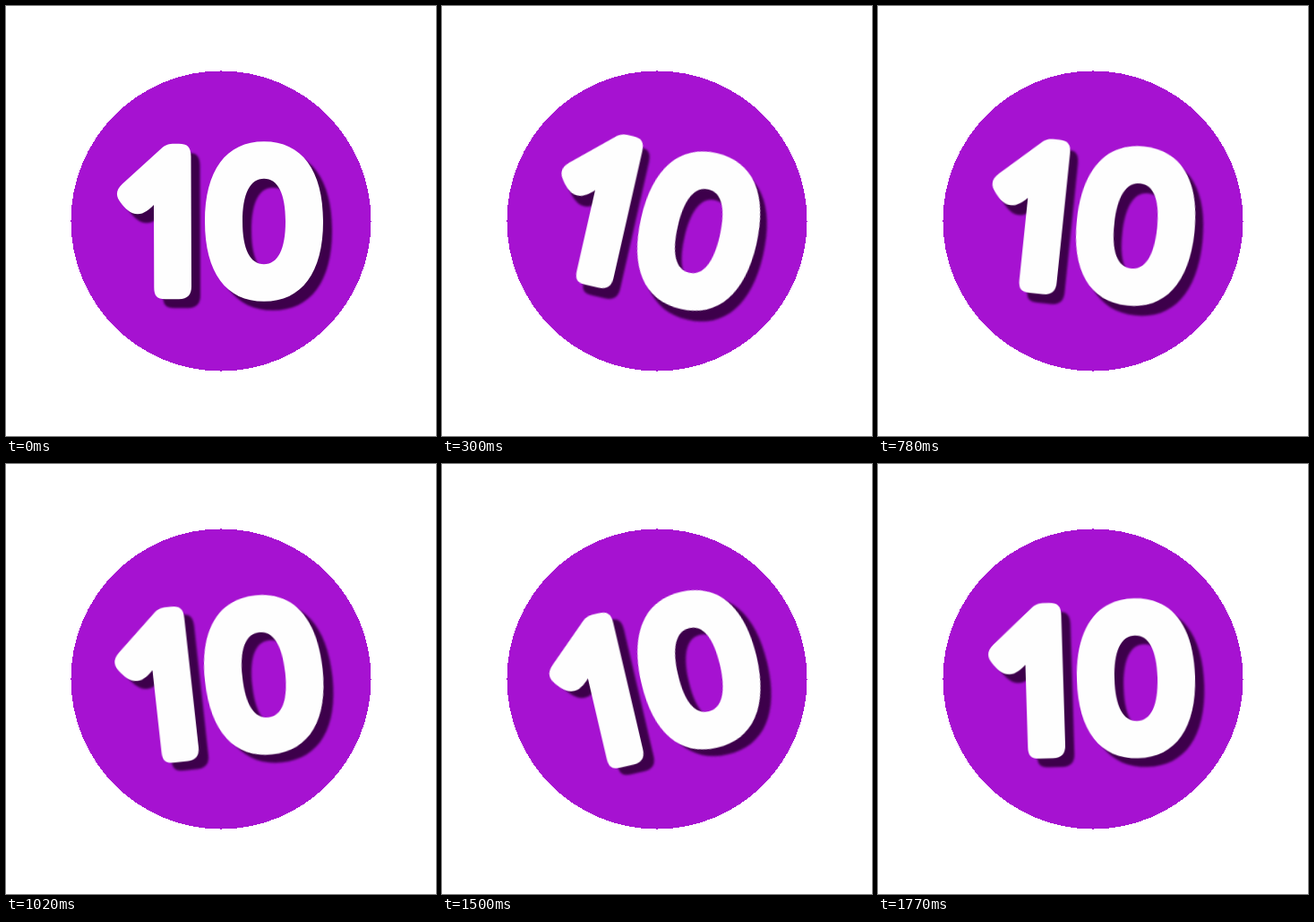
These frames come from a looping animation (480 px wide and 480 px high, 1.8 s). An HTML page:

```html
<!DOCTYPE html>
<html lang="en">
<head>
<meta charset="utf-8">
<title>Rocking ten</title>
<style>
  html, body { margin: 0; width: 100%; height: 100%; overflow: hidden; background: #fff; }
  svg { display: block; width: 100vw; height: 100vh; }
  #ten { transform-box: view-box; transform-origin: 240px 240px; }
</style>
</head>
<body>
<svg viewBox="0 0 480 480" role="img" aria-label="10">
  <defs>
    <filter id="soft" x="-10%" y="-10%" width="120%" height="120%">
      <feGaussianBlur stdDeviation="0.9"/>
    </filter>
    <g id="digits">
      <path d="M165 222 L165.300 314 C165.300 323 168 327.300 178 327.300 H193 C203 327 207 322 207 313
               L206.500 168 C206.500 157 202 153.700 193 153.700 H188 C182 153.700 178 155 174 158.500
               L130 198.500 C121.500 206.500 123 213 128 219.500 C133 226 139 232.300 147 232.300
               C154 232.300 160 227 165 222 Z"/>
      <path id="zero" fill-rule="evenodd"/>
    </g>
  </defs>
  <circle cx="240" cy="240" r="167.540" fill="#a612d1" shape-rendering="crispEdges"/>
  <g id="ten">
    <use href="#digits" x="10" y="10" fill="#3d064b" filter="url(#soft)"/>
    <use href="#digits" fill="#fefefe"/>
  </g>
</svg>
<script>
  const LOOP = 1800, STEP = 30, SWING = 15;

  // Oval from four curves; k sets how full its corners are.
  function oval(cx, cy, rx, ry, k) {
    const a = rx * k, b = ry * k;
    return `M${cx} ${cy - ry}` +
      `C${cx + a} ${cy - ry} ${cx + rx} ${cy - b} ${cx + rx} ${cy}` +
      `S${cx + a} ${cy + ry} ${cx} ${cy + ry}` +
      `S${cx - rx} ${cy + b} ${cx - rx} ${cy}` +
      `S${cx - a} ${cy - ry} ${cx} ${cy - ry}Z`;
  }

  document.getElementById('zero').setAttribute('d',
    oval(288, 240.5, 66, 89.3, 0.64) + oval(288, 240.5, 24, 47.7, 0.65));

  // The digits rock around the disc centre, one pose per step.
  const count = LOOP / STEP;
  const poses = Array.from({ length: count + 1 }, (_, i) => ({
    transform: `rotate(${SWING * Math.sin(2 * Math.PI * i / count)}deg)`,
    easing: 'step-end'
  }));
  document.getElementById('ten').animate(poses, { duration: LOOP, iterations: Infinity });
</script>
</body>
</html>
```
